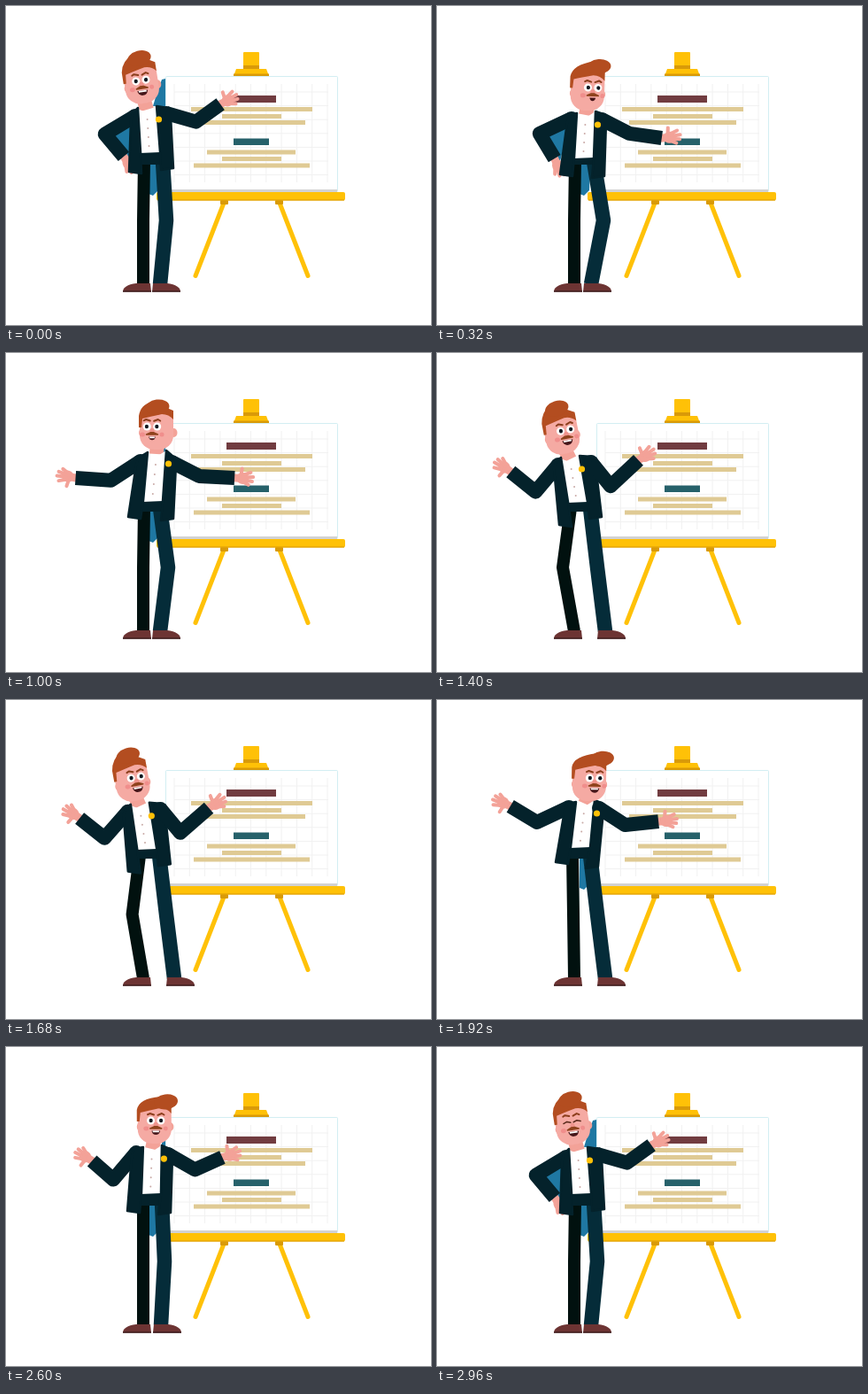
Write an HTML page with a canvas that moves like this. It is 480 by 360 pixels and loops after 3000 ms.

```html
<!DOCTYPE html>
<html lang="en">
<head>
<meta charset="utf-8">
<title>Presenter</title>
<style>
html, body { margin: 0; width: 100%; height: 100%; overflow: hidden; background: #fff; }
canvas { display: block; }
</style>
</head>
<body>
<canvas id="stage" width="480" height="360"></canvas>
<script>
const g = document.getElementById('stage').getContext('2d');
const LOOP = 3000, STEP = 40;
const SKIN = '#f5aaa3', HAND = '#f3a298', HAIR = '#b34d20', SUIT = '#04222b',
  BLACK = '#01110f', NAVY = '#052c39', SHOE = '#6d3433', BLUE = '#1f78a3',
  YELLOW = '#ffc107', AMBER = '#d99a08', TAN = '#dfca94';

// One row per pose; the presenter cycles through all six.
// x, y, tilt, gaze, quiff x, quiff y, mouth width
const HEAD = [
  [153, 88, -9, 0, 2, -29, 1],
  [170, 96, 2, 6, 12, -28, .35],
  [170, 87, 0, -5, 1, -26, .45],
  [141, 92, -11, 5, 0, -30, 1],
  [172, 92, 1, 6, 14, -26, .85],
  [168, 87, 0, 1.5, 13, -25, .7]
];
// collar, waist, left and right shoulder, left and right hem
const TORSO = [
  [159, 115, 162, 165, 146, 124, 181, 121, 139, 187, 189, 183],
  [168, 121, 165, 171, 152, 127, 186, 128, 139, 190, 189, 192],
  [170, 112, 165, 167, 152, 122, 187, 123, 138, 185, 189, 187],
  [150, 118, 158, 168, 137, 126, 174, 123, 138, 194, 186, 185],
  [167, 115, 161, 166, 149, 121, 183, 122, 134, 183, 182, 188],
  [165, 113, 163, 165, 147, 119, 183, 121, 137, 185, 186, 187]
];
// per side: upper arm angle, forearm angle, forearm length, hand angle
const ARMS = [
  [149, 50, 33, 55, 16, -36, 34, -25],
  [155, 59, 33, 65, 27, 8, 37, -5],
  [147, 184, 40, 192, 27, 3, 40, 3],
  [130, 219, 36, 215, 51, -43, 43, -30],
  [155, 211, 35, 206, 33, -6, 38, -3],
  [130, 224, 32, 214, 30, -24, 34, -14]
];
// left hip, left knee, right hip, right knee, right foot
const LEGS = [
  [156, 155, 177, 181, 174],
  [156, 155, 177, 188, 174],
  [156, 155, 174, 183, 174],
  [151, 142, 173, 181, 190],
  [153, 154, 173, 181, 190],
  [155, 155, 176, 179, 175]
];
// start and end of the move out of each pose
const MOVES = [[60, 300], [590, 860], [1120, 1380], [1620, 1880], [2020, 2280], [2560, 2820]];

const ease = p => p < .5 ? 4 * p ** 3 : 1 - (2 - 2 * p) ** 3 / 2;

function phase(t) {
  for (let i = 0; i < MOVES.length; i++) {
    const [a, b] = MOVES[i];
    if (t < a) return [i, 0];
    if (t < b) return [i, ease((t - a) / (b - a))];
  }
  return [0, 0];
}

const mix = (rows, [i, p]) => {
  const next = rows[(i + 1) % rows.length];
  return rows[i].map((v, k) => v + (next[k] - v) * p);
};

function polar(x, y, deg, len) {
  const a = deg * Math.PI / 180;
  return [x + Math.cos(a) * len, y + Math.sin(a) * len];
}

function box(x, y, w, h, color, r = 0) {
  g.fillStyle = color;
  g.beginPath();
  g.roundRect(x, y, w, h, r);
  g.fill();
}

function oval(x, y, rx, ry, color, rot = 0) {
  g.fillStyle = color;
  g.beginPath();
  g.ellipse(x, y, rx, ry, rot, 0, 7);
  g.fill();
}

function trace(pts) {
  g.beginPath();
  pts.forEach(p => g.lineTo(p[0], p[1]));
}

function poly(pts, color, edge = 0) {
  trace(pts);
  g.closePath();
  g.fillStyle = color;
  g.fill();
  if (edge) {
    g.lineWidth = edge;
    g.lineJoin = 'round';
    g.strokeStyle = color;
    g.stroke();
  }
}

function line(pts, width, color, cap = 'butt') {
  trace(pts);
  g.lineWidth = width;
  g.lineCap = cap;
  g.lineJoin = 'round';
  g.strokeStyle = color;
  g.stroke();
}

function easel() {
  box(268, 52, 18, 16, YELLOW, 1);
  box(268, 67, 18, 4, AMBER);
  poly([[260, 71], [294, 71], [297, 79], [257, 79]], YELLOW);
  box(257, 76.5, 40, 2.5, AMBER);

  box(180, 79, 195, 131, '#d3eef3', 2);
  box(181, 80, 193, 128, '#fff');
  for (let x = 190; x < 370; x += 17.3) line([[x, 88], [x, 199]], 1, '#f1f1f1');
  for (let y = 97; y < 200; y += 15.6) line([[190, y], [364, y]], 1, '#f1f1f1');
  box(181, 207, 193, 3, '#d2d2d2');

  box(249, 101, 56, 8, '#713c40');
  box(257, 149.5, 40, 7.5, '#26616a');
  for (const [x, y, w] of [[209, 114, 137], [244, 122, 67], [217, 129, 121],
    [227, 162.5, 100], [244, 170, 67], [212, 177.5, 131]]) box(x, y, w, 5, TAN);

  for (const [x, foot] of [[246.5, 214], [308.5, 341]]) {
    line([[x, 221], [foot, 304.5]], 5, YELLOW, 'round');
    box(x - 4.5, 219, 9, 5, AMBER, 1);
  }
  box(170, 210, 213, 9.5, YELLOW, 2);
  box(171, 218.5, 211, 1, AMBER);
}

function hand(x, y, deg, side) {
  g.save();
  g.translate(x, y);
  g.rotate(deg * Math.PI / 180);
  g.scale(1, side);
  line([[-2, 0], [7, 0]], 9, HAND);
  oval(9, 0, 7, 6.5, HAND);
  line([[7, -3], [8, -11]], 4, HAND, 'round');
  for (const [ex, ey] of [[18, -7], [21, -2], [20, 3], [16, 7]]) {
    line([[9, ey * .5], [ex, ey]], 4, HAND, 'round');
  }
  g.restore();
}

function arm(x, y, upper, lower, len, palm, upperLen, side) {
  const elbow = polar(x, y, upper, upperLen);
  const wrist = polar(...elbow, lower, len);
  hand(...wrist, palm, side);
  oval(x, y, 8, 8, SUIT);
  line([[x, y], elbow, wrist], 16, SUIT);
  return [elbow, wrist];
}

function shoe(x, dir) {
  g.beginPath();
  g.moveTo(x - 8 * dir, 313);
  g.lineTo(x + 8 * dir, 313);
  g.quadraticCurveTo(x + 23 * dir, 315, x + 23 * dir, 322.5);
  g.lineTo(x - 9 * dir, 322.5);
  g.fillStyle = SHOE;
  g.fill();
  line([[x - 9 * dir, 322], [x + 23 * dir, 322]], 1.4, '#3a1a1c');
}

function head([x, y, tilt, gaze, qx, qy, mouth], shut) {
  g.save();
  g.translate(x, y);
  g.rotate(tilt * Math.PI / 180);
  oval(18 - gaze * .3, 3, 4, 5, HAND);
  oval(-16, 3, 4, 5, HAND);
  box(-19, -23, 38, 45, SKIN, [12, 12, 16, 16]);

  g.fillStyle = HAIR;
  g.beginPath();
  g.moveTo(-20, -3);
  g.lineTo(-20, -16);
  g.quadraticCurveTo(-18, -29, qx - 6, qy - 6);
  g.lineTo(19, -22);
  g.lineTo(19, -12);
  g.quadraticCurveTo(14, -18, 6, -18);
  g.quadraticCurveTo(-8, -15, -16, -13);
  g.lineTo(-17, -3);
  g.fill();
  oval(qx, qy, 13.5, 8.5, HAIR, -.12);

  oval(gaze - 11, 5, 3, 2.5, '#f08e8c');
  oval(gaze + 11, 5, 2.5, 2.5, '#f08e8c');
  for (const s of [-1, 1]) {
    const ex = gaze + s * 5.7;
    line([[ex - 3.5, -10.5 + s * .3], [ex + s, -12], [ex + 3.5, -10.5]], 2, '#8c3e1c', 'round');
    if (shut) {
      line([[ex - 4, -3], [ex, -4.5], [ex + 4, -3]], 1.5, '#5a2a1c', 'round');
    } else {
      oval(ex, -4, 4.5, 4.5, '#fff');
      oval(ex + gaze * .08, -4, 2.1, 2.3, '#101820');
    }
  }
  oval(gaze, 1, 2.5, 3, '#ee938c');
  poly([[gaze - 6.5, 5], [gaze - 2, 2.8], [gaze + 2, 2.8], [gaze + 6.5, 5]], '#8f431d', 1.5);
  const w = 2 + 4 * mouth, d = 2.5 + 3 * mouth;
  g.fillStyle = '#45161a';
  g.beginPath();
  g.moveTo(gaze - w, 7.5);
  g.lineTo(gaze + w, 7.5);
  g.quadraticCurveTo(gaze + w * .8, 7.5 + d, gaze, 7.5 + d);
  g.quadraticCurveTo(gaze - w * .8, 7.5 + d, gaze - w, 7.5);
  g.fill();
  if (mouth > .4) box(gaze - w * .75, 7.5, w * 1.5, 1.7, '#fff');
  g.restore();
}

// blue pockets of backdrop enclosed by the body
function pockets(pose) {
  if (pose === 0) poly([[180, 82], [180, 113], [166, 113], [171, 96], [176, 83]], BLUE);
  if (pose === 2 || pose === 5) box(176, 99, 4, 14, BLUE);
  if (pose !== 3) poly([[161, 172], [174, 172], [172, 208], [166, 214], [161, 212]], BLUE);
}

function presenter(t) {
  const at = phase(t);
  const pose = (at[0] + (at[1] > .5)) % 6;
  const face = mix(HEAD, at), arms = mix(ARMS, at);
  const [cx, cy, wx, wy, slx, sly, srx, sry, hlx, hly, hrx, hry] = mix(TORSO, at);
  const [lh, lk, rh, rk, rf] = mix(LEGS, at);

  pockets(pose);
  if (pose < 2 && arms[1] < 80) {
    const elbow = polar(slx, sly, arms[0], 40);
    poly([[slx, sly], elbow, polar(...elbow, arms[1], arms[2]), [hlx, hly - 15]], BLUE);
  }
  arm(slx, sly, ...arms.slice(0, 4), 40, 1);

  line([[lh, 175], [lk, 242], [155, 314]], 14, BLACK);
  line([[rh, 175], [rk, 242], [rf, 314]], 16.5, NAVY);
  poly([[wx - 12, wy - 2], [wx + 12, wy - 2], [rh + 8, 179], [lh - 7, 179]], SUIT);
  shoe(155, -1);
  shoe(rf, 1);

  line([[face[0] + 1, face[1] + 12], [cx, cy + 2]], 16, HAND);
  poly([[cx - 11, cy + 1], [cx, cy + 5], [cx + 11, cy - 2],
    [wx + 12, wy], [wx - 11, wy + 1]], '#fff');
  for (let k = 1; k < 5; k++) {
    oval(cx + (wx - cx) * k * .21, cy + 3 + (wy - cy) * k * .2, 1, 1, '#c9aaa6');
  }
  poly([[cx - 10, cy], [slx - 2, sly - 4], [slx - 5, sly + 4], [hlx, hly],
    [hlx + 14, hly + 2], [wx - 10, wy]], SUIT, 2.5);
  poly([[cx + 11, cy - 2], [srx + 2, sry - 6], [srx + 5, sry + 3], [hrx, hry],
    [hrx - 14, hry + 2], [wx + 12, wy]], SUIT, 2.5);

  arm(srx, sry, ...arms.slice(4), 35, 1);
  oval(cx + 13.5, cy + 13, 3.6, 3.6, YELLOW);
  head(face, t >= 2920);
}

function draw(now) {
  const t = Math.floor((now % LOOP) / STEP) * STEP;
  g.fillStyle = '#fff';
  g.fillRect(0, 0, 480, 360);
  easel();
  presenter(t);
}

const start = performance.now();
function tick() {
  draw(performance.now() - start);
  requestAnimationFrame(tick);
}
tick();
</script>
</body>
</html>
```
